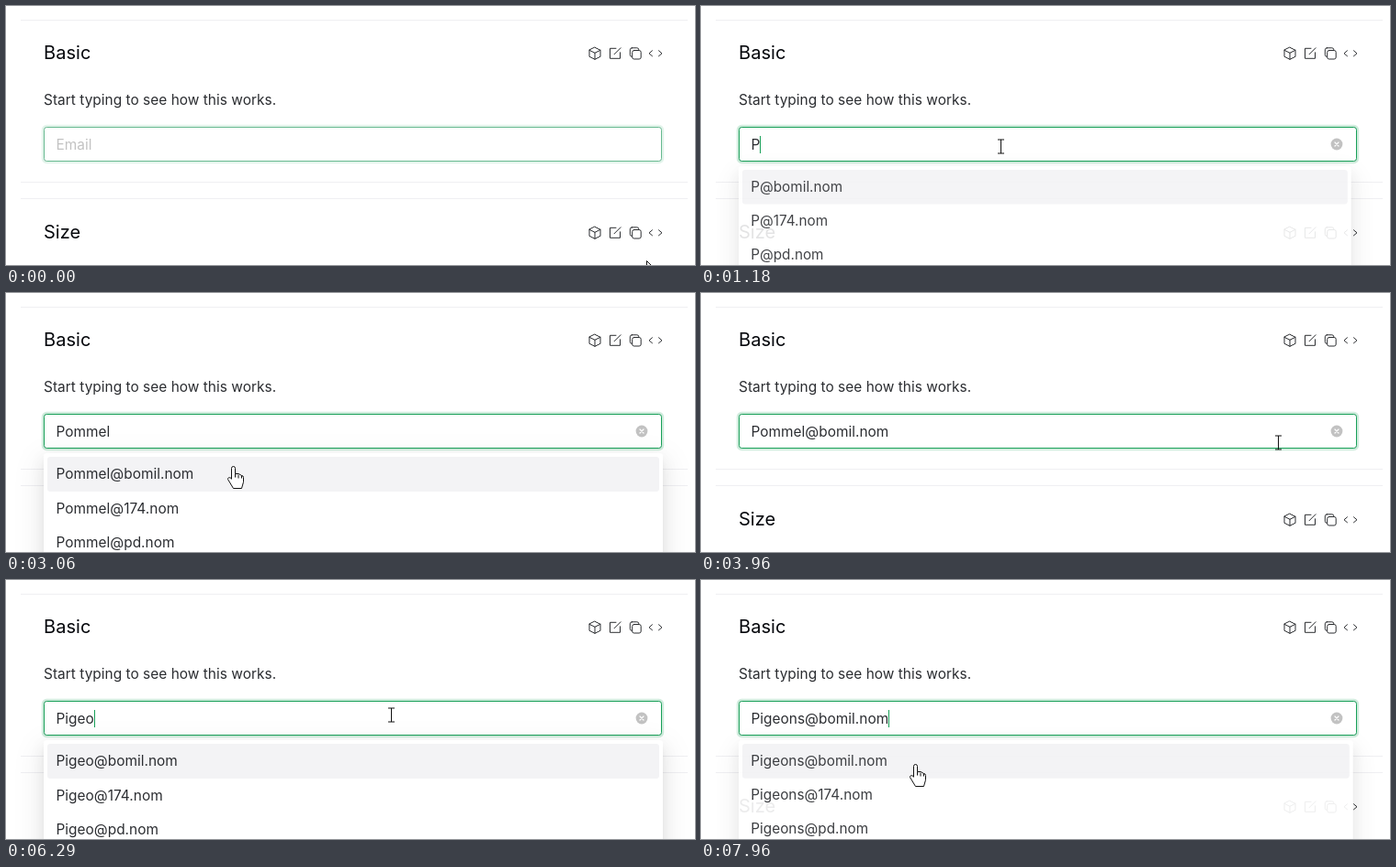
An HTML page that plays this animation: 750 by 283 pixels, repeating every 8000 ms.

```html
<!DOCTYPE html>
<html lang="en">
<head>
<meta charset="utf-8">
<title>Email auto-complete</title>
<style>
  html, body { margin: 0; width: 100%; height: 100%; overflow: hidden; background: #fff; }
  #stage { position: relative; width: 750px; height: 283px; overflow: hidden; background: #fff;
    font: 15.4px Inter, "Open Sans", sans-serif; letter-spacing: .04px; color: #2b2d31; white-space: pre; }
  #stage * { box-sizing: border-box; }
  #stage > * { position: absolute; }
  .rule { left: 16px; width: 726px; height: 1px; background: #efeff2; }
  .title { left: 41px; line-height: 40px; font-size: 20px; color: #05070c; }
  .intro { left: 41px; top: 83px; line-height: 40px; }
  .overlay { left: 0; top: 0; width: 750px; height: 283px; }
  .field, .focus { left: 41px; top: 132px; width: 673px; height: 38px; border-radius: 3.3px; }
  .field { border: 1px solid #e0e0e6; line-height: 38px; padding-left: 12.4px; }
  .focus { border: 1px solid #18a058; box-shadow: 0 0 0 2.2px rgba(24, 160, 88, .2); }
  #hint { position: absolute; left: 12.4px; top: 0; color: #c2c2c2; }
  #caret { display: inline-block; width: 1px; height: 19px; margin-right: -1px; vertical-align: -4px; background: #18a058; }
  #menu { left: 41px; top: 175px; width: 674px; height: 233px; padding: 4.4px; border-radius: 3.3px;
    background: #fff; transform-origin: 0 0;
    box-shadow: 0 3px 7px -4px rgba(0, 0, 0, .12), 0 7px 18px rgba(0, 0, 0, .08), 0 10px 31px 9px rgba(0, 0, 0, .05); }
  .option { height: 37.4px; line-height: 37.4px; padding-left: 9px; border-radius: 3.3px; }
  .option:first-child { background: #f3f3f5; }
  .icon { fill: #fff; stroke: #2b2d30; stroke-linejoin: round; stroke-linecap: round; }
</style>
</head>
<body>
<div id="stage">
  <div class="rule" style="top:15px"></div>
  <div class="rule" style="top:192px"></div>
  <div class="rule" style="top:210px"></div>
  <div class="title" style="top:31px">Basic</div>
  <div class="title" style="top:227px">Size</div>
  <div class="intro">Start typing to see how this works.</div>
  <svg class="overlay">
    <defs>
      <g id="tools" class="icon">
        <path d="M641-6.5l6 3v7l-6 3-6-3v-7zM635-3.5l6 3 6-3M641-.5v7"/>
        <path d="M664-5.5h-6.5v11h11v-6.5M669-6l-7 7"/>
        <rect x="679.3" y="-6" width="9.5" height="9.5" rx="2"/>
        <rect x="681.7" y="-3.3" width="9.5" height="9.5" rx="2"/>
        <path fill="none" d="M703.5-3l-3.5 3 3.5 3M710.5-3l3.5 3-3.5 3"/>
      </g>
    </defs>
    <use href="#tools" y="51.8"/>
    <use href="#tools" y="247.8"/>
  </svg>
  <div class="field"><span id="value"></span><i id="caret"></i><span id="hint">Email</span></div>
  <div class="focus" id="focus"></div>
  <svg class="overlay" id="clear">
    <circle cx="692" cy="151" r="6.4" fill="#c2c2c2"/>
    <path d="M690 149l4 4m0-4l-4 4" stroke="#fff" stroke-width="1.2" stroke-linecap="round"/>
  </svg>
  <div id="menu"><div class="option"></div><div class="option"></div><div class="option"></div></div>
  <svg class="overlay">
    <g id="pointer" fill="#fff" stroke="#111" stroke-linejoin="round">
      <path id="arrow" d="M0 0v16l4-3.5 2 5.5 2.5-1-2.5-5.5h5.5z"/>
      <path id="beam" d="M-3.5-7.5h7M0-7.5v15M-3.5 7.5h7"/>
      <path id="hand" d="M-2 14v-12a2 2 0 0 1 4 0v6q4-1 7 2 2 0 2 2v5l-2 7h-9l-6-10q0-3 4-1M2 8v4M5.5 9v4M9 10v3"/>
    </g>
  </svg>
</div>
<script>
  const LOOP = 8000, BLINK = 535, KEY_GAP = 132, FADE = 260;
  const HOSTS = ['@bomil.nom', '@174.nom', '@pd.nom'];
  const $ = id => document.getElementById(id);
  const options = [...document.querySelectorAll('.option')];
  const clamp = v => Math.min(1, Math.max(0, v));
  const progress = (t, from, to) => clamp((t - from) / (to - from));
  const smooth = k => k * k * (3 - 2 * k);

  // Each visit: bursts of keys, then a pick from the open menu.
  const visits = [
    { bursts: [['P', 910], ['omm', 1270], ['el', 2130]], open: 1045, pick: 3420, clear: 4450 },
    { bursts: [['Pigeons', 5670]], open: 5740, pick: 7830 }
  ];

  const moves = [
    { from: 30, to: 680, x: 326, y: 153, bend: 0 },
    { from: 2600, to: 3060, x: 247, y: 189, bend: -38 },
    { from: 3420, to: 4130, x: 692, y: 154, bend: 8 },
    { from: 4480, to: 5200, x: 419, y: 147, bend: 16 },
    { from: 6830, to: 7410, x: 233, y: 201, bend: -60 }
  ];

  function editsOf({ bursts, pick, clear }) {
    const edits = [];
    let query = '';
    for (const [keys, begin] of bursts) {
      [...keys].forEach((key, i) => {
        query += key;
        edits.push({ at: begin + i * KEY_GAP, text: query, query });
      });
    }
    edits.push({ at: pick, text: query + HOSTS[0], query });
    if (clear) edits.push({ at: clear, text: '', query });
    return edits;
  }

  const edits = visits.flatMap(editsOf);
  const idle = { at: 660, text: '', query: '' };

  function pointerAt(t) {
    let x = 697, y = 278;
    for (const move of moves) {
      const k = smooth(progress(t, move.from, move.to));
      x += (move.x - x) * k;
      y += (move.y - y) * k + move.bend * 4 * k * (1 - k);
    }
    return [Math.round(x), Math.round(y)];
  }

  function menuAt(t) {
    return Math.max(...visits.map(({ open, pick }) => {
      const enter = 1 - (1 - progress(t, open, open + FADE)) ** 3;
      const leave = progress(t, pick + 20, pick + 20 + FADE) ** 3;
      return enter - leave;
    }));
  }

  function pointerKind(x, y, menuShown, hasText) {
    if (y > 170) return menuShown > .5 ? 'hand' : 'arrow';
    if (y < 132) return 'arrow';
    return hasText && Math.abs(x - 692) < 9 ? 'hand' : 'beam';
  }

  function setText(el, text) {
    if (el.textContent !== text) el.textContent = text;
  }

  function render(t) {
    const { at, text, query } = edits.filter(e => e.at <= t).pop() || idle;
    setText($('value'), text);
    options.forEach((el, i) => setText(el, query + HOSTS[i]));
    $('hint').style.opacity = text ? 0 : 1;
    $('clear').style.opacity = text ? 1 : 0;
    $('caret').style.opacity = t >= at && Math.floor((t - at) / BLINK) % 2 === 0 ? 1 : 0;
    $('focus').style.opacity = .6 + .4 * progress(t, 0, FADE);

    const shown = menuAt(t);
    $('menu').style.opacity = shown;
    $('menu').style.transform = shown < 1 ? `scale(${.9 + .1 * shown})` : 'none';

    const [x, y] = pointerAt(t);
    const kind = pointerKind(x, y, shown, text);
    $('pointer').setAttribute('transform', `translate(${x + .5} ${y + .5})`);
    for (const id of ['arrow', 'beam', 'hand']) $(id).style.display = id === kind ? '' : 'none';
  }

  const origin = performance.now();
  function tick() {
    render((performance.now() - origin) % LOOP);
    requestAnimationFrame(tick);
  }
  tick();
</script>
</body>
</html>
```
